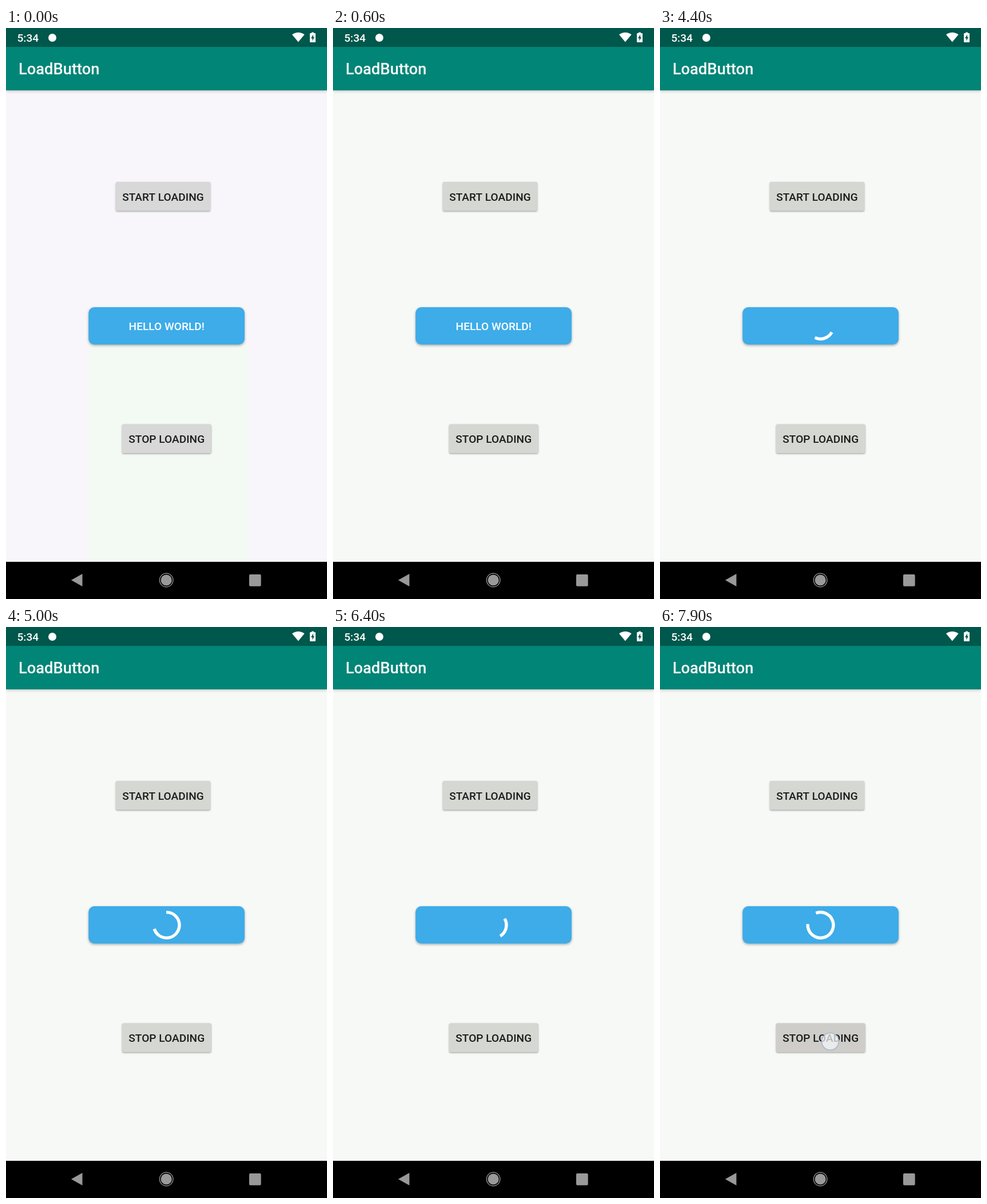
An HTML page with a canvas for the animation above (8 s loop, 561 by 998 pixels).

```html
<!DOCTYPE html>
<html lang="en">
<head>
<meta charset="utf-8">
<title>Load button</title>
<style>
  html, body { margin: 0; width: 100%; height: 100%; overflow: hidden; background: #000; }
  canvas { display: block; width: 561px; height: 998px; }
</style>
</head>
<body>
<canvas id="stage" width="561" height="998"></canvas>
<script>
const ctx = document.getElementById('stage').getContext('2d');
const LOOP = 8000, STEP = 100;
const SPIN_START = 4328, SWEEP_START = 4303, SPIN_FROM = 4400;
const SWEEP_MS = 1300, TURN_MS = 900, MIN_SWEEP = 50;

const START = { x: 192, y: 269, w: 165, h: 50.5, label: 'START LOADING' };
const STOP = { x: 203, y: 692.5, w: 155.5, h: 50.5, label: 'STOP LOADING' };
const TAPS = [
  { button: START, x: 287.5, y: 279, from: 3900, up: 4300, lead: 0 },
  { button: STOP, x: 297.5, y: 724.5, from: 7800, up: 8000, lead: 100 }
];

const clamp = v => Math.max(0, Math.min(1, v));
const mix = (a, b, k) => `rgb(${a.map((v, i) => Math.round(v + (b[i] - v) * k))})`;

function rect(x, y, w, h, color) {
  ctx.fillStyle = color;
  ctx.fillRect(x, y, w, h);
}

function round(x, y, w, h, r, color) {
  ctx.beginPath();
  ctx.roundRect(x, y, w, h, r);
  ctx.fillStyle = color;
  ctx.fill();
}

function disc(x, y, r, color) {
  ctx.beginPath();
  ctx.arc(x, y, r, 0, Math.PI * 2);
  ctx.fillStyle = color;
  ctx.fill();
}

function ring(x, y, r, width, color) {
  ctx.beginPath();
  ctx.arc(x, y, r, 0, Math.PI * 2);
  ctx.lineWidth = width;
  ctx.strokeStyle = color;
  ctx.stroke();
}

function poly(points, color) {
  ctx.beginPath();
  points.forEach(([x, y]) => ctx.lineTo(x, y));
  ctx.closePath();
  ctx.fillStyle = color;
  ctx.fill();
}

function text(str, x, y, size, color, align = 'left') {
  ctx.font = `500 ${size}px Roboto, sans-serif`;
  ctx.textAlign = align;
  ctx.fillStyle = color;
  ctx.fillText(str, x, y);
}

function shadowed(blur, dy, alpha, draw) {
  ctx.save();
  ctx.shadowColor = `rgba(0,0,0,${alpha})`;
  ctx.shadowBlur = blur;
  ctx.shadowOffsetY = dy;
  draw();
  ctx.restore();
}

function drawPage(settle) {
  rect(0, 0, 561, 998, mix([248, 246, 250], [247, 249, 246], settle));
  if (settle < 1) rect(145, 553, 278, 380, mix([243, 250, 243], [247, 249, 246], settle));
}

function drawBars() {
  shadowed(5, 1.5, 0.22, () => rect(0, 33, 561, 76, '#008577'));
  rect(0, 0, 561, 33, '#00574b');
  text('5:34', 19.5, 23.5, 19.1, '#fff');
  disc(81, 17, 7, '#fff');
  text('LoadButton', 22, 81, 27.3, '#fff');

  // Wi-Fi fan
  ctx.beginPath();
  ctx.moveTo(500, 11.5);
  ctx.quadraticCurveTo(510.8, 4, 521.6, 11.5);
  ctx.lineTo(510.8, 24.5);
  ctx.closePath();
  ctx.fillStyle = '#fff';
  ctx.fill();

  // Battery
  round(534, 7.5, 4, 3, 0.5, '#fff');
  round(531, 9, 10, 16, 1, '#fff');
  poly([[537, 11.5], [533, 18], [535.4, 18], [535.4, 22.5], [539, 16], [537, 16]], '#00574b');

  rect(0, 933, 561, 65, '#000');
  poly([[114, 965], [133.5, 954], [133.5, 976]], '#999');
  disc(280.2, 965, 9.6, '#999');
  ring(280.2, 965, 11.8, 1.3, '#999');
  round(425, 955, 20.7, 20.7, 2, '#999');
}

function drawButton(b, t, settle) {
  const fill = mix([216, 216, 216], [213, 215, 211], settle);
  shadowed(3, 1.2, 0.36, () => round(b.x, b.y, b.w, b.h, 2.5, fill));
  const tap = TAPS.find(p => p.button === b);
  if (t >= tap.from && t < tap.up) drawRipple(tap, t);
  text(b.label, b.x + b.w / 2, b.y + 32.5, 19.1, '#1b1c1b', 'center');
}

function drawRipple(tap, t) {
  const b = tap.button;
  const age = t - tap.from + tap.lead;
  if (age <= 0) return;
  ctx.save();
  ctx.beginPath();
  ctx.roundRect(b.x, b.y, b.w, b.h, 2.5);
  ctx.clip();
  disc(tap.x, tap.y, age / 2, 'rgba(80,60,60,.06)');
  ctx.restore();
}

function drawSpinner(t) {
  const phase = (t - SWEEP_START) / SWEEP_MS;
  const lap = Math.floor(phase);
  const shift = 2 * MIN_SWEEP * Math.floor(lap / 2);
  const grown = (360 - 2 * MIN_SWEEP) * (1 - (1 - phase + lap) ** 2);
  let start = (t - SPIN_START) / TURN_MS * 360 - shift;
  let sweep = grown + MIN_SWEEP;
  if (lap % 2) {
    start += grown;
    sweep = 360 - grown - MIN_SWEEP;
  }
  const rad = Math.PI / 180;
  ctx.beginPath();
  ctx.arc(280.6, 521, 22.4, start * rad, (start + sweep) * rad);
  ctx.lineWidth = 5.4;
  ctx.strokeStyle = '#fff';
  ctx.stroke();
}

function drawLoader(t) {
  shadowed(4, 1.8, 0.32, () => round(144.3, 488, 272.7, 65.3, 10, '#3dace9'));
  if (t >= SPIN_FROM) drawSpinner(t);
  else text('HELLO WORLD!', 280.7, 528, 19.1, '#fff', 'center');
}

function drawPointer(tap, t) {
  if (t < tap.from || t >= tap.up) return;
  disc(tap.x, tap.y, 15, 'rgba(245,247,246,.72)');
  ring(tap.x, tap.y, 14.9, 1.8, 'rgba(165,182,205,.85)');
}

function draw(t) {
  const settle = clamp(t / 600);
  drawPage(settle);
  drawBars();
  drawButton(START, t, settle);
  drawLoader(t);
  drawButton(STOP, t, settle);
  TAPS.forEach(tap => drawPointer(tap, t));
}

let origin;
function tick(now) {
  origin ??= now;
  const t = (now - origin) % LOOP;
  draw(Math.floor(t / STEP) * STEP);
  requestAnimationFrame(tick);
}
draw(0);
requestAnimationFrame(tick);
</script>
</body>
</html>
```
